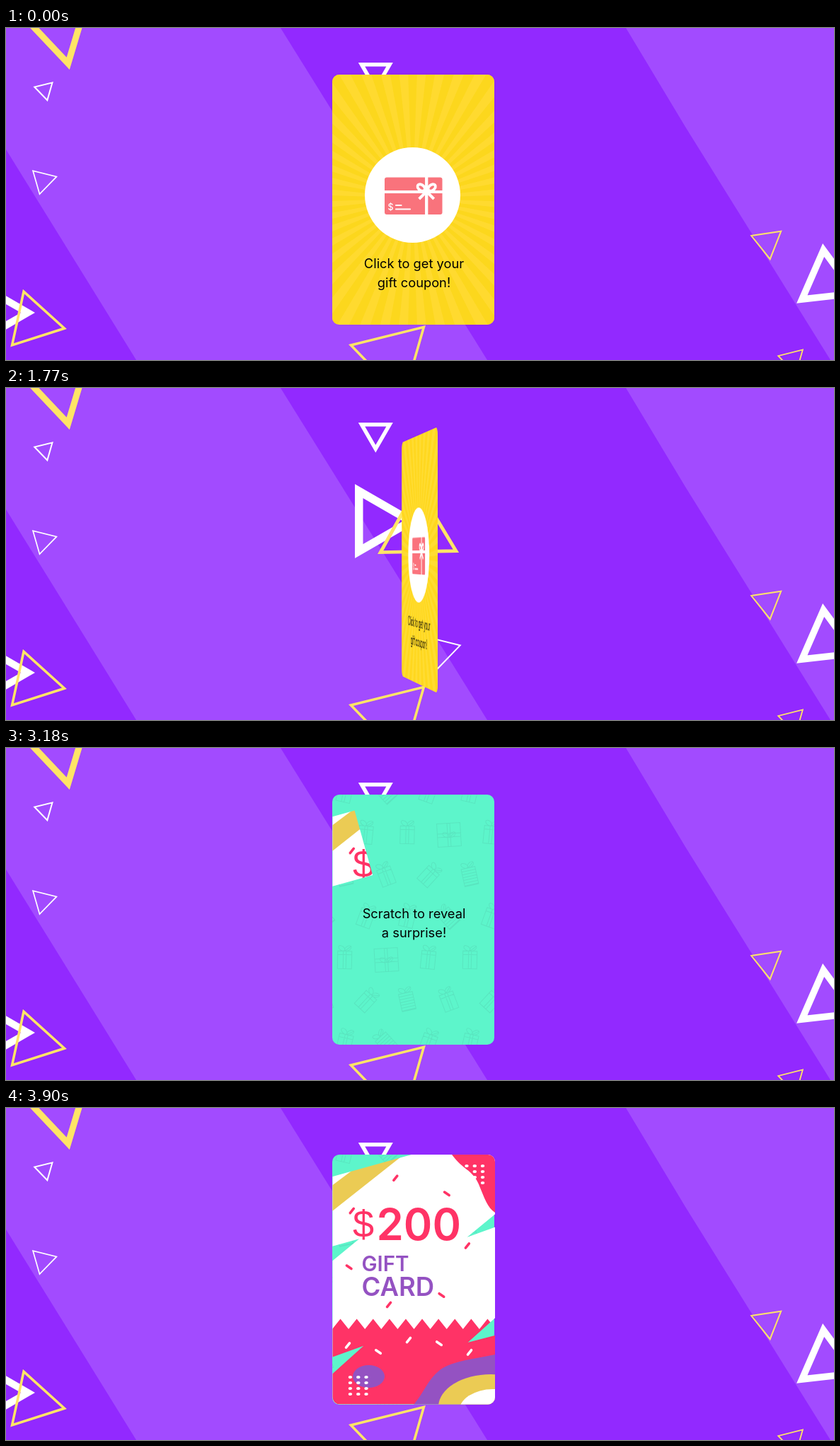
Write an HTML page with a canvas that moves like this. It is 1170x470 px and loops after 5400 ms.

```html
<!DOCTYPE html>
<html lang="en">
<head>
<meta charset="utf-8">
<title>Scratch card</title>
<style>
  html, body { margin: 0; width: 100%; height: 100%; overflow: hidden; background: #9229ff; }
  canvas { display: block; width: 1170px; height: 470px; }
</style>
</head>
<body>
<canvas id="stage" width="1170" height="470"></canvas>
<script>
const W = 1170, H = 470, MID_X = W / 2, MID_Y = H / 2, EYE = 1680;
const LOOP = 5400, STEP = 30;
const TAP = 1050, TAP_END = 1350, FLIP_START = 1320, FLIP_END = 2010, SCRATCH = 3180;
const CARD = { x: 461, y: 66, w: 229, h: 354, r: 10 };
const CARD_MID = 576.5;
const WHITE = '#fff', YELLOW = '#ffe566', RED = '#ff3366', PURPLE = '#9452c2', GOLD = '#ebcb54';
const CORAL = '#f9737c', SKIN = '#fccfa8', NAVY = '#1d3557';
const BODY_FONT = '18.3px Inter, sans-serif';

function layer() {
  const canvas = document.createElement('canvas');
  canvas.width = W;
  canvas.height = H;
  return canvas.getContext('2d');
}

const stage = document.getElementById('stage').getContext('2d');
const [scene, face, prize, scratched, turned] = Array.from({ length: 5 }, layer);

function trace(g, points) {
  g.beginPath();
  points.forEach(([x, y]) => g.lineTo(x, y));
}

function polygon(g, points, color) {
  trace(g, points);
  g.fillStyle = color;
  g.fill();
}

function line(g, points, width, color, cap = 'butt') {
  trace(g, points);
  g.lineWidth = width;
  g.lineCap = cap;
  g.strokeStyle = color;
  g.stroke();
}

function oval(g, x, y, rx, ry, color) {
  g.beginPath();
  g.ellipse(x, y, rx, ry, 0, 0, 7);
  g.fillStyle = color;
  g.fill();
}

function label(g, text, x, y, font, color = '#000', align = 'center') {
  g.font = font;
  g.textAlign = align;
  g.fillStyle = color;
  g.fillText(text, x, y);
}

function insideCard(g, paint) {
  g.save();
  g.beginPath();
  g.roundRect(CARD.x, CARD.y, CARD.w, CARD.h, CARD.r);
  g.clip();
  paint(g);
  g.restore();
}

// Equilateral outline; the stroke lies inside the given radius.
function triangle(g, x, y, radius, degrees, width, color) {
  const r = radius - width;
  trace(g, [0, 1, 2].map(i => {
    const a = (degrees + i * 120) * Math.PI / 180;
    return [x + r * Math.cos(a), y + r * Math.sin(a)];
  }));
  g.closePath();
  g.lineWidth = width;
  g.strokeStyle = color;
  g.stroke();
}

function drawScene(g) {
  g.fillStyle = '#9229ff';
  g.fillRect(0, 0, W, H);
  polygon(g, [[0, 0], [388, 0], [680, H], [184, H], [0, 172]], '#a24bff');
  polygon(g, [[876, 0], [W, 0], [W, H], [1165, H], [960, 140]], '#a24bff');

  triangle(g, 76, 0.6, 60, 76.7, 9, YELLOW);
  triangle(g, 54.7, 87.7, 17, -44, 2, WHITE);
  triangle(g, 52.3, 216, 21.5, -16, 1.7, WHITE);
  triangle(g, -13, 403, 54, 0, 10, WHITE);
  triangle(g, 38.7, 415.8, 48.3, 12.2, 3.5, YELLOW);
  triangle(g, 522.3, 63.2, 28.3, 90, 5.5, WHITE);
  triangle(g, 523.3, 188.5, 60.6, 0, 11.5, WHITE);
  triangle(g, 582, 200.8, 66.4, -91, 4.8, YELLOW);
  triangle(g, 609, 373.7, 36, -16, 2, WHITE);
  triangle(g, 546.3, 465.9, 64.8, -44, 3.5, YELLOW);
  triangle(g, 1076, 303, 26.5, -38.5, 2, YELLOW);
  triangle(g, 1160, 358, 53.3, -96.4, 9.5, WHITE);
  triangle(g, 1111, 469.8, 22.4, -44, 1.8, YELLOW);
}

function drawRays(g, x, y, count) {
  const spoke = turns => {
    const a = turns * 2 * Math.PI / count;
    return [x + 300 * Math.sin(a), y - 300 * Math.cos(a)];
  };
  for (let i = 0; i < count; i++) polygon(g, [[x, y], spoke(i - 0.25), spoke(i + 0.25)], '#fcd71d');
}

function drawVoucher(g) {
  g.fillStyle = CORAL;
  g.beginPath();
  g.roundRect(535, 211.5, 81.5, 52.5, 3);
  g.fill();
  const knot = [594.2, 231.5];
  line(g, [[knot[0], 211], [knot[0], 265]], 4.3, WHITE);
  line(g, [[535, 232], [617, 232]], 3.8, WHITE);
  for (const side of [-1, 1]) {
    g.beginPath();
    g.ellipse(knot[0] + side * 7.5, 226, 5.8, 4, side * -0.7, 0, 7);
    g.fillStyle = CORAL;
    g.fill();
    g.lineWidth = 4;
    g.stroke();
    line(g, [knot, [knot[0] + side * 10.5, 242]], 4, WHITE);
  }
  oval(g, ...knot, 5, 5, WHITE);
  label(g, '$', 543.5, 257.5, '500 12.5px Inter, sans-serif', WHITE);
  line(g, [[551, 251], [558.5, 251]], 2.2, WHITE, 'round');
  line(g, [[551, 256.5], [571, 256.5]], 2.2, WHITE, 'round');
}

function drawHand(g) {
  const outlined = (x, y, w, h, radius) => {
    g.beginPath();
    g.roundRect(x, y, w, h, radius);
    g.strokeStyle = NAVY;
    g.lineWidth = 1.4;
    g.stroke();
    g.fillStyle = SKIN;
    g.fill();
  };
  const thumb = [[565.4, 266.4], [573, 280.5]];
  line(g, thumb, 6.2, NAVY, 'round');
  outlined(571.5, 268, 21.5, 17.2, [0, 0, 7, 7]);
  for (let i = 0; i < 4; i++) {
    const top = i ? 257.4 + i : 247.4;
    outlined(571.5 + i * 5.4, top, 5.4, 272 - top, [2.7, 2.7, 0, 0]);
  }
  g.fillStyle = SKIN;
  g.fillRect(572.2, 267, 20.1, 10);
  line(g, thumb, 3.6, SKIN, 'round');
  g.beginPath();
  g.arc(574, 249.3, 5.6, Math.PI * 0.9, Math.PI * 2.1);
  g.lineWidth = 1.4;
  g.strokeStyle = NAVY;
  g.stroke();
}

function drawFront(g, tapping) {
  g.fillStyle = '#ffda2f';
  g.fillRect(CARD.x, CARD.y, CARD.w, CARD.h);
  drawRays(g, 574.5, 241, 44);
  oval(g, 574.5, 236.5, 67.5, 67.5, WHITE);
  drawVoucher(g);
  label(g, 'Click to get your', CARD_MID, 340, BODY_FONT);
  label(g, 'gift coupon!', CARD_MID, 367, BODY_FONT);
  if (tapping) drawHand(g);
}

function drawGift(g, x, y, turn, kind) {
  const w = kind === 'crate' ? 33 : 20, h = kind === 'crate' ? 33 : 25, top = -h / 2;
  g.save();
  g.translate(x, y);
  g.rotate(turn);
  g.beginPath();
  g.rect(-w / 2, top, w, h);
  if (kind === 'striped') {
    for (let s = top + 4; s < -top; s += 4) { g.moveTo(-w / 2, s); g.lineTo(w / 2, s); }
  } else {
    g.rect(-2, top, 4, h);
    g.rect(-w / 2, kind === 'crate' ? -2 : top, w, 5);
  }
  const knot = kind === 'crate' ? 4 : top;
  for (const side of [-1, 1]) {
    g.moveTo(0, knot);
    g.ellipse(side * 4.5, knot - 4, 5, 3, side * -0.6, 0, 7);
  }
  g.stroke();
  g.restore();
}

// Nine gifts repeat on a slanted lattice.
function drawPattern(g) {
  const pitch = 59;
  g.strokeStyle = 'rgba(75, 165, 145, 0.2)';
  g.lineWidth = 1;
  for (let row = -1; row < 6; row++) {
    for (let col = -1; col < 7; col++) {
      const n = (col + 3) % 3 + 3 * ((row + 3) % 3);
      const kind = n === 2 ? 'crate' : n && n % 3 === 0 ? 'striped' : 'box';
      const turn = n < 3 ? 0.1 - n * 0.08 : 0.8 * Math.sin(n * 2.4 + 2.5);
      drawGift(g, 508 + pitch * (col - row / 2), 123 + pitch * row, turn, kind);
    }
  }
}

function drawBack(g) {
  g.fillStyle = '#5df5cb';
  g.fillRect(CARD.x, CARD.y, CARD.w, CARD.h);
  drawPattern(g);
  label(g, 'Scratch to reveal', CARD_MID, 241, BODY_FONT);
  label(g, 'a surprise!', CARD_MID, 268, BODY_FONT);
}

function fleck(g, x, y, i, color) {
  const angle = i % 2 ? 0.6 : -0.9, dx = 4 * Math.cos(angle), dy = 4 * Math.sin(angle);
  line(g, [[x - dx, y - dy], [x + dx, y + dy]], 3.6, color, 'round');
}

function dots(g, x, y) {
  for (let i = 0; i < 12; i++) oval(g, x + i % 3 * 11.3, y + (i / 3 | 0) * 8, 2.7, 2.1, WHITE);
}

function drawPrize(g) {
  const left = 461, right = 691, top = 66, bottom = 419.5;
  g.beginPath();
  g.roundRect(left + 0.5, top, right - left - 0.5, bottom - top, CARD.r);
  g.clip();
  g.fillStyle = WHITE;
  g.fillRect(left, top, right - left, bottom - top);

  polygon(g, [[left, 109.5], [519, top], [562, top], [left, 146]], GOLD);
  g.fillStyle = RED;
  g.fill(new Path2D('M630 66 C646 88 659 87 668 108 C676 127 680 141 691 148 V66 Z'));
  dots(g, 651, 82);

  const teeth = Array.from({ length: 21 }, (_, i) => [left + i * 11.55, i % 2 ? 298.5 : 313]);
  polygon(g, [[left, bottom], ...teeth, [right + 1, bottom]], RED);
  oval(g, 512.5, 380, 22.5, 16, PURPLE);
  dots(g, 486.5, 381);
  g.fillStyle = PURPLE;
  g.fill(new Path2D('M576 420 C590 404 596 384 613 371 C632 357 665 355 691 349 V420 Z'));
  oval(g, 685, 423, 74, 46, GOLD);
  oval(g, 688, 430, 48, 32, WHITE);

  for (let i = 0; i < 7; i++) {
    const a = (i / 7 - 0.277) * 2 * Math.PI;
    fleck(g, 565 + 87 * Math.cos(a), 190 + 92 * Math.sin(a), i, RED);
  }
  for (let i = 0; i < 5; i++) fleck(g, 483 + 43 * i, 336 + 10 * Math.sin(2 * i), i, WHITE);

  label(g, '$', 490, 182.5, '54px "Liberation Sans", Arial, sans-serif', RED, 'left');
  label(g, '200', 523.5, 187, '600 61.5px Inter, sans-serif', RED, 'left');
  label(g, 'GIFT', 502.5, 231, '600 29.5px Inter, sans-serif', PURPLE, 'left');
  label(g, 'CARD', 502.5, 266, '600 36.5px Inter, sans-serif', PURPLE, 'left');
}

const SCRATCH_PATH = [[384, 168], [703, 79], [409, 321], [717.5, 209.6], [476, 427], [768, 351]];

function partialPath(points, length) {
  const out = [points[0]];
  for (let i = 1; i < points.length && length > 0; i++) {
    const [ax, ay] = points[i - 1], [bx, by] = points[i];
    const span = Math.hypot(bx - ax, by - ay), k = Math.min(1, length / span);
    out.push([ax + (bx - ax) * k, ay + (by - ay) * k]);
    length -= span;
  }
  return out;
}

function drawReveal(g, length) {
  scratched.globalCompositeOperation = 'source-over';
  scratched.clearRect(0, 0, W, H);
  line(scratched, partialPath(SCRATCH_PATH, length), 95, '#000');
  scratched.globalCompositeOperation = 'source-in';
  scratched.drawImage(prize.canvas, 0, 0);
  g.drawImage(scratched.canvas, 0, 0);
}

// Projects the card column by column, averaging several source columns in each.
function drawTurned(g, source, angle) {
  const sin = Math.sin(angle), cos = Math.cos(angle), samples = 5;
  turned.clearRect(0, 0, W, H);
  turned.globalCompositeOperation = 'lighter';
  turned.globalAlpha = 1 / samples;
  for (let x = -140; x < 140; x++) {
    for (let i = 0; i < samples; i++) {
      const across = x + (i + 0.5) / samples;
      const u = across * EYE / (EYE * cos - across * sin);
      const column = Math.floor(MID_X + u), scale = EYE / (EYE + u * sin);
      if (column < CARD.x || column > CARD.x + CARD.w) continue;
      turned.drawImage(source, column, 0, 1, H, MID_X + x, MID_Y * (1 - scale), 1, H * scale);
    }
  }
  g.drawImage(turned.canvas, 0, 0);
}

// Slow start, nearly linear finish: cubic-bezier(.6, 0, .8, .8).
function flipEase(u) {
  if (u <= 0 || u >= 1) return u <= 0 ? 0 : 1;
  const curve = (s, a, b) => 3 * (1 - s) ** 2 * s * a + 3 * (1 - s) * s * s * b + s ** 3;
  let low = 0, high = 1;
  for (let i = 0; i < 24; i++) {
    const mid = (low + high) / 2;
    if (curve(mid, 0.6, 0.8) < u) low = mid; else high = mid;
  }
  return curve(low, 0, 0.8);
}

let shown = -1;
function render(time) {
  const t = Math.floor(time % LOOP / STEP) * STEP;
  if (t === shown) return;
  shown = t;
  const turn = Math.PI * flipEase((t - FLIP_START) / (FLIP_END - FLIP_START));
  const isFront = turn < Math.PI / 2;
  const angle = isFront ? -turn : Math.PI - turn;

  face.clearRect(0, 0, W, H);
  insideCard(face, g => isFront ? drawFront(g, t >= TAP && t < TAP_END) : drawBack(g));
  if (t >= SCRATCH) drawReveal(face, 126 + 2.09 * (t - SCRATCH));

  stage.drawImage(scene.canvas, 0, 0);
  if (angle) drawTurned(stage, face.canvas, angle);
  else stage.drawImage(face.canvas, 0, 0);
}

drawScene(scene);
drawPrize(prize);
const start = performance.now();
function tick() {
  render(performance.now() - start);
  requestAnimationFrame(tick);
}
tick();
</script>
</body>
</html>
```
